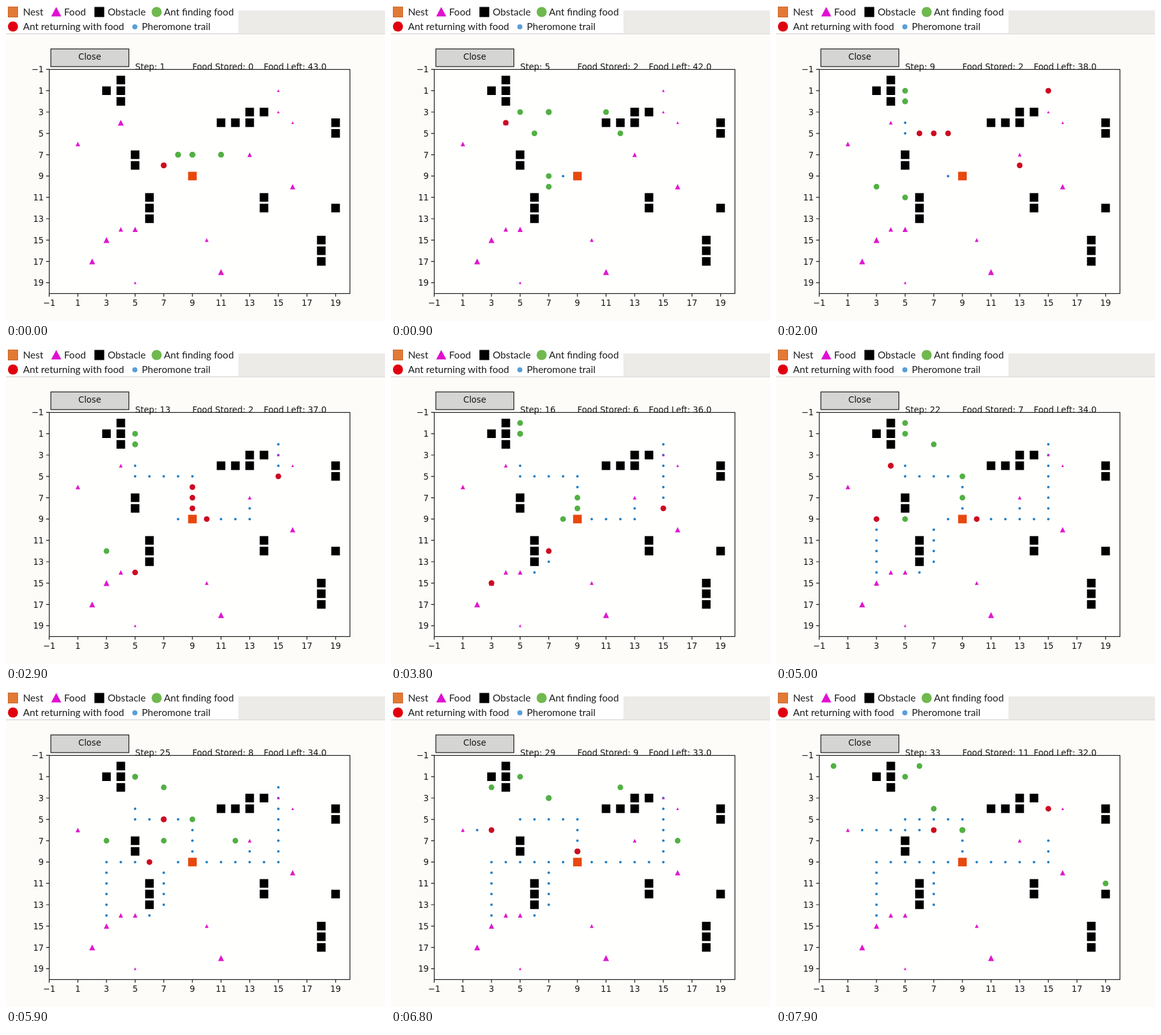
These frames come from a looping animation (600 px wide and 499 px high, 8 s). An HTML page:

```html
<!DOCTYPE html>
<html lang="en">
<head>
<meta charset="utf-8">
<title>Ant foraging</title>
<style>
  html, body { margin: 0; width: 100%; height: 100%; overflow: hidden; background: #fdfcf9; }
  svg { display: block; width: 600px; height: 499px; }
  text { font: 13.3px "DejaVu Sans", sans-serif; fill: #161616; }
  .key text { font: 15.5px Lato, sans-serif; fill: #1c1c1c; }
  .mid { text-anchor: middle; }
  .end { text-anchor: end; }
  .line { fill: none; stroke: #1a1a1a; stroke-width: 1.2; }
  .food { fill: #e018cd; }
  .find { fill: #52b043; }
  .carry { fill: #cd0a20; }
  .trail { fill: #1f7fc6; }
</style>
</head>
<body>
<svg viewBox="0 0 600 499">
  <rect width="600" height="44" fill="#fff"/>
  <rect x="368" y="7" width="232" height="36" fill="#ecebe8"/>
  <rect y="43.5" width="600" height="1" fill="#c9c9c9"/>
  <g class="key">
    <rect x="3.5" y="1.5" width="15" height="16" fill="#e27a36" stroke="#c9652a"/>
    <path d="M79.5 1.5L87.5 16.5H71.5Z" fill="#e010d0"/>
    <rect x="140" y="1.5" width="15.5" height="16"/>
    <circle cx="238.5" cy="9.5" r="8" fill="#6fb94e"/>
    <circle cx="11" cy="32.5" r="8" fill="#e0000f"/>
    <circle cx="204" cy="33" r="4" fill="#5a9ed8"/>
    <text x="27" y="14.5">Nest</text>
    <text x="92" y="14.5">Food</text>
    <text x="161" y="14.5">Obstacle</text>
    <text x="250" y="14.5">Ant finding food</text>
    <text x="27" y="38">Ant returning with food</text>
    <text x="215" y="38">Pheromone trail</text>
  </g>
  <rect x="71" y="68" width="123.5" height="28" fill="#d5d5d3"/>
  <rect class="line" x="71" y="68" width="123.5" height="28"/>
  <text class="mid" x="132.5" y="85">Close</text>
  <rect x="68.5" y="100.5" width="476" height="355" fill="#fffffe"/>
  <g id="axes"></g>
  <g id="world"></g>
  <g id="fixed"></g>
  <text id="step" x="204.5" y="101"></text>
  <text id="stored" x="295" y="101"></text>
  <text id="left" x="408" y="101"></text>
</svg>
<script>
const LOOP = 8000, STEPS = 34, TRAIL_LIFE = 18, NEST = '9 9';
const $ = id => document.getElementById(id);
const px = x => 68.4 + (x + 1) * 22.67;
const py = y => 100.4 + (y + 1) * 16.9;
const parse = s => s.split(';').map(p => p.split(' ').map(Number));
const sum = list => list.reduce((a, b) => a + b, 0);

const square = (x, y, color) =>
  `<rect x="${px(x) - 6.8}" y="${py(y) - 6.8}" width="13.6" height="13.6" fill="${color}"/>`;
const dot = (x, y, r, cls) => `<circle class="${cls}" cx="${px(x)}" cy="${py(y)}" r="${r}"/>`;
const triangle = (x, y, amount) => {
  const h = 2.1 * Math.sqrt(amount), cx = px(x), cy = py(y);
  return `<path class="food" d="M${cx} ${cy - h}L${cx + h} ${cy + h}H${cx - h}Z"/>`;
};

let axes = '<rect class="line" x="68.5" y="100.5" width="476" height="355"/>';
for (let v = -1; v < 20; v += 2) {
  const label = String(v).replace('-', '\u2212');
  axes += `<path class="line" d="M${px(v)} 455.5v5M68.5 ${py(v)}h-5"/>
    <text class="mid" x="${px(v)}" y="475">${label}</text>
    <text class="end" x="59.8" y="${py(v) + 5}">${label}</text>`;
}
$('axes').innerHTML = axes;

// Obstacle columns: x, first y, length
const walls = parse('4 0 3;3 1 1;5 7 2;6 11 3;11 4 1;12 4 1;13 3 2;14 3 1;14 11 2;19 4 2;19 12 1;18 15 3');
let fixed = square(9, 9, '#e8480d');
for (const [x, y, n] of walls)
  for (let i = 0; i < n; i++) fixed += square(x, y + i, '#000');
$('fixed').innerHTML = fixed;

// Food: x, y, units
const food = new Map(parse('4 4 5;1 6 3;15 1 1;15 3 1;16 4 1;13 7 3;16 10 4;4 14 3;5 14 4;3 15 5;2 17 5;10 15 2;11 18 5;5 19 1')
  .map(([x, y, n]) => [x + ' ' + y, n]));

// Each ant heads for its stops (x, y, steps to rest there), one cell per step
const ant = (route, red = false) => {
  const [[x, y, rest = 0], ...stops] = parse(route);
  return { x, y, rest, red, stops };
};
const ants = [
  ant('8 7;4 4;9 5;9 9;9 7 1;4 4;8 5;9 9;9 0'),
  ant('8 7;5 3;4 4;9 5;9 9;9 8;7 2 6;7 3 1;6 0'),
  ant('8 7 2;6 5;4 4;5 4;9 5;9 9 2;9 5 4;12 2;14 2;15 3;15 9'),
  ant('9 7;7 3 2;5 1 6;5 0 8;5 3;4 3;3 2 1;0 0'),
  ant('9 7;7 3 2;5 2 6;5 1'),
  ant('9 7;7 3 2;5 2 6;5 1 3;5 3;4 4;8 5;9 9;9 0'),
  ant('11 7;10 4;11 3;15 1;15 9;9 9;7 3 3;7 4'),
  ant('11 7 2;12 5 1;13 7;13 9;9 9 1;8 9 3;5 9 1;1 6;9 6'),
  ant('7 8;9 9;7 9;3 10 2;3 15;3 9;9 9;9 8 2;9 6', true),
  ant('7 8;9 9;8 9;7 10 2;6 10;5 11 1;5 14;6 14;7 13;7 10;9 9;9 7;16 7;19 11', true)
];

const trail = new Map();
let stored = 0;

function advance(a, step) {
  if (a.rest-- > 0 || !a.stops.length) return;
  const [x, y, rest = 0] = a.stops[0];
  a.x += Math.sign(x - a.x);
  a.y += Math.sign(y - a.y);
  const cell = a.x + ' ' + a.y;
  // A carrying ant leaves a trail; each further pass prolongs it
  if (a.red) trail.set(cell, Math.max(trail.get(cell) || 0, step) + TRAIL_LIFE);
  if (a.x !== x || a.y !== y) return;
  a.stops.shift();
  a.rest = rest;
  if (a.red && cell === NEST) {
    a.red = false;
    stored++;
  } else if (!a.red && food.get(cell)) {
    a.red = true;
    food.set(cell, food.get(cell) - 1);
  }
}

function draw(step) {
  let out = '';
  for (const [cell, end] of trail)
    if (end >= step) out += dot(...cell.split(' ').map(Number), 2, 'trail');
  for (const [cell, n] of food)
    if (n) out += triangle(...cell.split(' ').map(Number), n);
  for (const a of [...ants].sort((a, b) => a.red - b.red))
    out += dot(a.x, a.y, 4.5, a.red ? 'carry' : 'find');
  return out;
}

const scenes = [];
for (let step = 1; step < STEPS; step++) {
  if (step > 1) ants.forEach(a => advance(a, step));
  scenes[step] = { world: draw(step), stored, left: sum([...food.values()]) };
}

// The simulation runs at a slightly uneven pace: time, step
const pace = [[0, 1], [900, 5], [3900, 17], [5000, 22], [LOOP, STEPS]];
function stepAt(ms) {
  const t = Math.floor(ms / 100) * 100;
  const i = pace.findIndex(p => p[0] > t);
  const [t0, s0] = pace[i - 1], [t1, s1] = pace[i];
  return Math.floor(s0 + (s1 - s0) * (t - t0) / (t1 - t0) + 1e-6);
}

let shown = 0, start = null;
function show(step) {
  if (step === shown) return;
  shown = step;
  const s = scenes[step];
  $('world').innerHTML = s.world;
  $('step').textContent = 'Step: ' + step;
  $('stored').textContent = 'Food Stored: ' + s.stored;
  $('left').textContent = 'Food Left: ' + s.left.toFixed(1);
}
function tick(now) {
  if (start === null) start = now;
  show(stepAt(Math.max(0, now - start) % LOOP));
  requestAnimationFrame(tick);
}
show(1);
requestAnimationFrame(tick);
</script>
</body>
</html>
```
